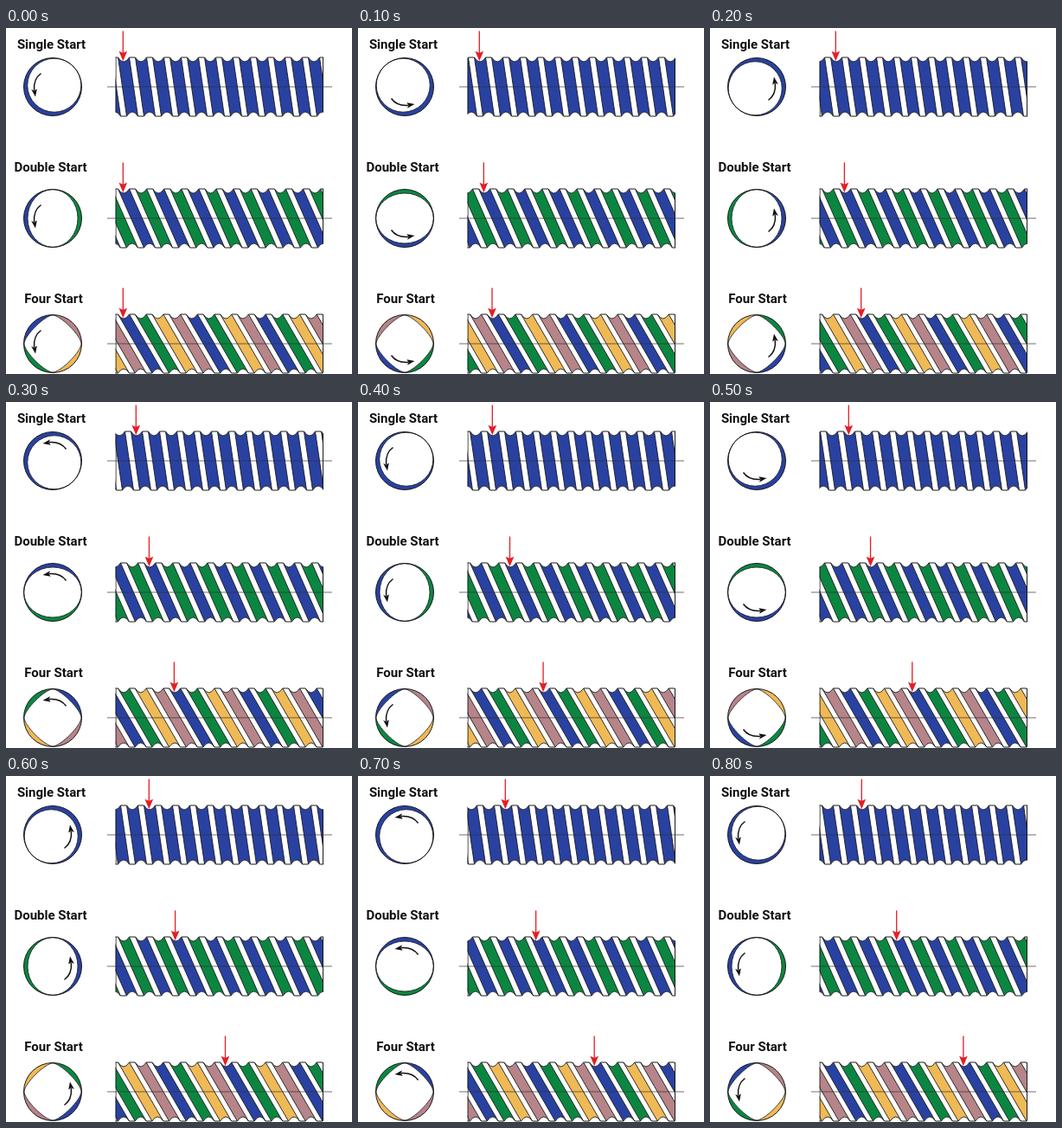
An HTML page for the animation above (2800 ms loop, 400x400 px).

```html
<!DOCTYPE html>
<html lang="en">
<head>
<meta charset="utf-8">
<title>Thread starts</title>
<style>
html, body { margin: 0; width: 100%; height: 100%; overflow: hidden; background: #fff; }
svg { display: block; width: 100vw; height: 100vh; }
text { font: bold 15px Roboto, "Liberation Sans", sans-serif; text-anchor: middle; fill: #111; }
.ink { fill: none; stroke: #1a1a1a; stroke-width: 1; }
.axis { stroke: #333; stroke-width: .7; }
.pointer { stroke: #e31e26; stroke-width: 1.3; fill: #e31e26; }
</style>
</head>
<body>
<svg id="stage" viewBox="0 0 400 400">
  <clipPath id="shaft"><rect x="126.5" y="0" width="240.5" height="400"/></clipPath>
</svg>
<script>
const BLUE = '#2941a1', GREEN = '#0b8640', GOLD = '#efb956', MAUVE = '#b68489';
const LEFT = 127, RIGHT = 366.5, HALF = 34, GROOVE = 6.5, DIP = 5;
const STEP = 100, LAST = 8, LOOP = 2800;

// lean: how far a thread moves right between the top and bottom edge
const rows = [
  { name: 'Single Start', tx: 52.5, ty: 23.5, y: 68, pitch: 20, lean: 10, colors: [BLUE] },
  { name: 'Double Start', tx: 51.5, ty: 165.5, y: 220, pitch: 20.1, lean: 30, colors: [BLUE, GREEN] },
  { name: 'Four Start', tx: 55, ty: 317.5, y: 365, pitch: 19.7, lean: 39.4, colors: [BLUE, GREEN, GOLD, MAUVE] }
];

const stage = document.getElementById('stage');

function add(parent, tag, attrs) {
  const el = document.createElementNS('http://www.w3.org/2000/svg', tag);
  for (const key in attrs) el.setAttribute(key, attrs[key]);
  parent.appendChild(el);
  return el;
}

// Cross-section: coloured disc with the white root shape on top.
function drawSection(parent, colors) {
  const r = 33.5;
  const slices = {
    1: [`M${r},0A${r},${r} 0 1 1 ${-r},0A${r},${r} 0 1 1 ${r},0Z`],
    2: [`M0,${-r}A${r},${r} 0 0 0 0,${r}Z`, `M0,${-r}A${r},${r} 0 0 1 0,${r}Z`],
    4: [[0, -1, -1, 0], [-1, 0, 0, 1], [0, 1, 1, 0], [1, 0, 0, -1]].map(([a, b, c, d]) =>
      `M0,0L${a * r},${b * r}A${r},${r} 0 0 0 ${c * r},${d * r}Z`)
  }[colors.length];
  slices.forEach((d, i) => add(parent, 'path', { d, fill: colors[i] }));
  const white = { fill: '#fff', stroke: '#1a1a1a', 'stroke-width': .8 };
  if (colors.length === 1) add(parent, 'circle', { cx: 1.8, cy: -1.8, r: 31, ...white });
  if (colors.length === 2) add(parent, 'ellipse', { rx: 29, ry: 33.3, ...white });
  if (colors.length === 4) {
    add(parent, 'path', {
      d: 'M0,-33C9,-33 33,-9 33,0S9,33 0,33S-33,9 -33,0S-9,-33 0,-33Z', ...white
    });
  }
  add(parent, 'circle', { class: 'ink', r });
  add(parent, 'path', { d: 'M-13.5,-15.5Q-22.5,-9 -21.4,4', fill: 'none', stroke: '#111', 'stroke-width': 1.5 });
  add(parent, 'path', { d: 'M-20,11.5L-24.8,3L-21.4,4.4L-18.2,2.4Z', fill: '#111' });
}

for (const row of rows) {
  add(stage, 'text', { x: row.tx, y: row.ty }).textContent = row.name;
  const hub = add(stage, 'g', { transform: `translate(54 ${row.y})` });
  row.section = add(hub, 'g', {});
  drawSection(row.section, row.colors);
  row.screw = add(stage, 'g', { 'clip-path': 'url(#shaft)' });
  add(stage, 'line', { class: 'axis', x1: 117, x2: 377, y1: row.y, y2: row.y });
  row.pointer = add(stage, 'path', { class: 'pointer', d: 'M0,3.5V30M0,36.5L-3.6,28L0,29.5L3.6,28Z' });
}

// Depth of the groove profile at x, for grooves centred on c + k * pitch.
function depth(x, c, pitch) {
  const d = (x - c) - Math.round((x - c) / pitch) * pitch;
  return Math.max(0, DIP * (1 - (d / GROOVE) ** 2));
}

function drawScrew({ screw, y, pitch, lean, colors }, center) {
  const n = colors.length;
  const top = y - HALF, bottom = y + HALF;
  screw.replaceChildren();
  const first = Math.floor((LEFT - lean - pitch - center) / pitch);
  const end = Math.ceil((RIGHT + pitch - center) / pitch);
  let crests = '';
  for (let k = first; k <= end; k++) {
    const c = center + k * pitch, a = c - GROOVE, b = c + GROOVE, next = a + pitch;
    const d = `M${a},${top}Q${c},${top + 2 * DIP} ${b},${top}L${b + lean},${bottom}` +
      `Q${c + lean},${bottom - 2 * DIP} ${a + lean},${bottom}Z`;
    add(screw, 'path', { d, fill: colors[(k % n + n) % n], stroke: '#1a1a1a', 'stroke-width': .9 });
    crests += `M${b},${top}H${next}M${b + lean},${bottom}H${next + lean}`;
  }
  for (const x of [LEFT, RIGHT]) {
    crests += `M${x},${top + depth(x, center, pitch)}V${bottom - depth(x, center + lean, pitch)}`;
  }
  add(screw, 'path', { class: 'ink', d: crests });
}

let shown = -1;
function draw(step) {
  shown = step;
  for (const row of rows) {
    const x = 136 + step * row.pitch * row.colors.length / 4;
    row.section.setAttribute('transform', `rotate(${-90 * step})`);
    row.pointer.setAttribute('transform', `translate(${x - .7} ${row.y - 68})`);
    drawScrew(row, x);
  }
}

function tick() {
  const step = Math.min(LAST, Math.floor(performance.now() % LOOP / STEP));
  if (step !== shown) draw(step);
  requestAnimationFrame(tick);
}
tick();
</script>
</body>
</html>
```
